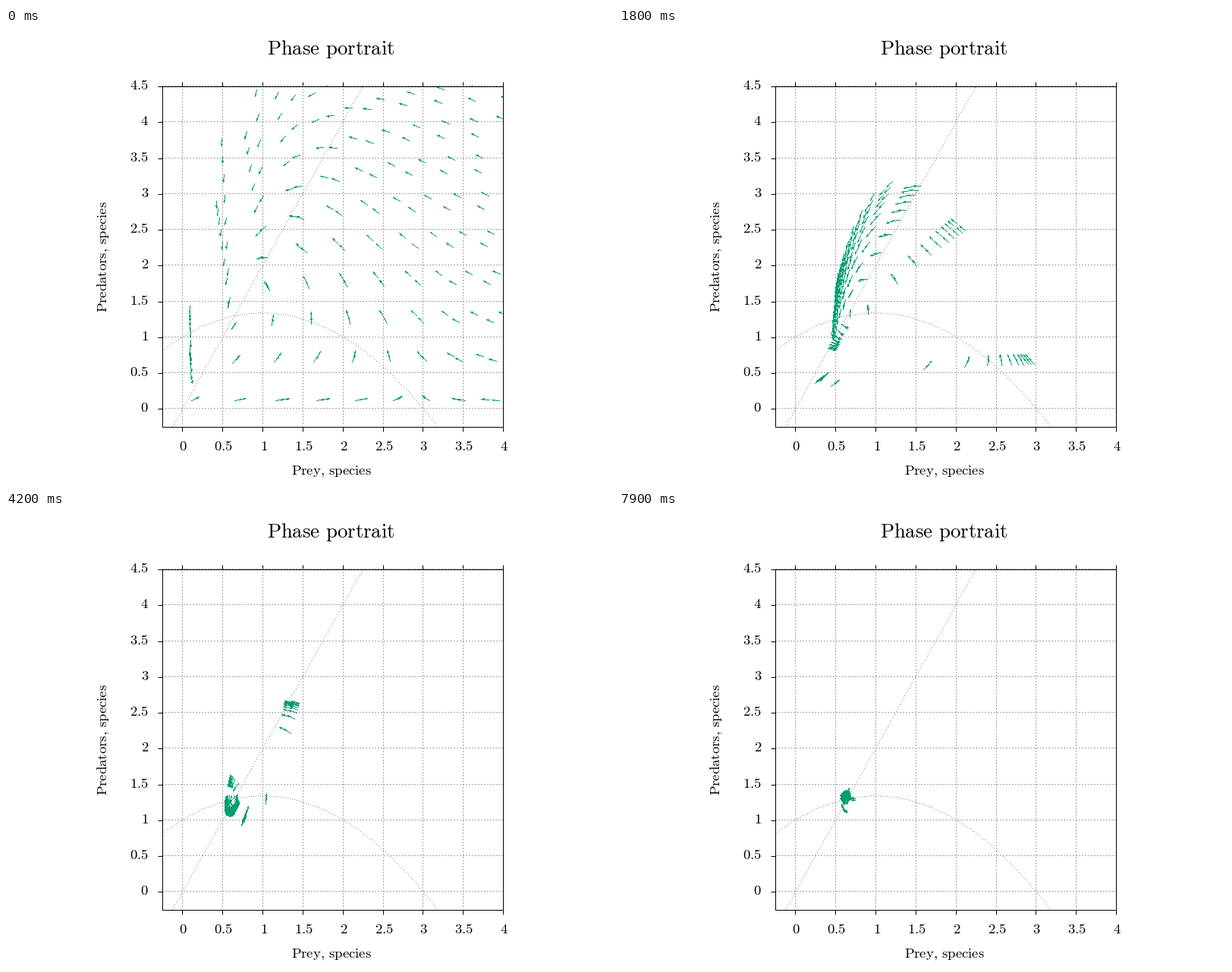
These frames come from a looping animation (800 by 600 pixels, 8000 ms). A matplotlib script:

```python
import numpy as np
import matplotlib.pyplot as plt
from matplotlib.animation import FuncAnimation
from matplotlib.patches import Rectangle

plt.rcParams["mathtext.fontset"] = "cm"

W, H, DPI = 800, 600, 100
PX = 72 / DPI
LEFT, RIGHT, TOP, BOTTOM = 206, 655, 77, 526
XMIN, XMAX, YMIN, YMAX = -0.25, 4.0, -0.25, 4.5
GREEN, GRID, CURVE = "#009e73", "#a0a0a0", "#909090"
FRAMES, INTERVAL = 80, 100
DT, SUBSTEPS = 0.1, 25
ARROW = 0.1                                   # arrow length in plot units
HEAD_SIZE, HEAD_ANGLE = 0.3, np.radians(15)   # head length relative to arrow


def to_px(p):
    x = LEFT + (p[..., 0] - XMIN) / (XMAX - XMIN) * (RIGHT - LEFT)
    y = BOTTOM - (p[..., 1] - YMIN) / (YMAX - YMIN) * (BOTTOM - TOP)
    return np.stack([x, y], axis=-1)


def field(p):
    """Prey grow logistically; predators are limited by twice the prey."""
    x, y = p[..., 0], p[..., 1]
    dx = x * (1 - x / 3) - x * y / (1 + x)
    dy = y * (1 - y / (2 * x))
    return np.stack([dx, dy], axis=-1)


def rk4(p, h):
    k1 = field(p)
    k2 = field(p + h / 2 * k1)
    k3 = field(p + h / 2 * k2)
    k4 = field(p + h * k3)
    return p + h / 6 * (k1 + 2 * k2 + 2 * k3 + k4)


def solve(steps):
    start = 0.1 + 0.5 * np.arange(11)
    p = np.stack(np.meshgrid(start, start), axis=-1).reshape(-1, 2)
    states = [p]
    for _ in range(steps):
        for _ in range(SUBSTEPS):
            p = rk4(p, DT / SUBSTEPS)
        states.append(p)
    return np.array(states)


def raster(a, b):
    """Pixels of the hard-edged lines from a to b, line after line."""
    a, b = np.rint(a), np.rint(b)
    n = np.maximum(np.abs(b - a).max(axis=1), 1)
    k = np.arange(n.max() + 1)
    t = np.minimum(k / n[:, None], 1)[..., None]
    p = np.rint(a[:, None] + t * (b - a)[:, None])
    p = p[k <= n[:, None]]
    inside = ((p >= (LEFT, TOP)) & (p <= (RIGHT, BOTTOM))).all(axis=1)
    return p[inside]


def rotate(v, angle):
    c, s = np.cos(angle), np.sin(angle)
    return v @ np.array([[c, s], [-s, c]])


def arrow_pixels(p):
    v = field(p)
    v = v / np.linalg.norm(v, axis=-1, keepdims=True)
    tail, tip = to_px(p), to_px(p + ARROW * v)
    barb = HEAD_SIZE * (tail - tip)
    ends = [tail, tip + rotate(barb, HEAD_ANGLE), tip + rotate(barb, -HEAD_ANGLE)]
    return np.concatenate([raster(e, tip) for e in ends])


states = solve(FRAMES + 1)

fig = plt.figure(figsize=(W / DPI, H / DPI), dpi=DPI, facecolor="white")
ax = fig.add_axes([0, 0, 1, 1])
ax.set_xlim(0, W)
ax.set_ylim(H, 0)
ax.axis("off")
ax.add_patch(Rectangle((LEFT, TOP), RIGHT - LEFT, BOTTOM - TOP, fill=False,
                       ec="black", lw=PX, zorder=5))


def dots(x, y, color, zorder=2):
    art, = ax.plot(x, y, ",", color=color, zorder=zorder)
    return art


def tick(xs, ys):
    ax.plot(xs, ys, color="black", lw=PX, solid_capstyle="butt")


def text(x, y, s, size=18.67, **kw):
    s = s.replace(", ", r",\,").replace(" ", r"\,\>")
    ax.text(x, y, rf"$\mathrm{{{s}}}$", fontsize=size * PX, va="baseline",
            rotation_mode="anchor", **kw)


def dashed(lo, hi):
    p = np.arange(lo, hi)
    return p[(p - lo) % 4 < 2]


def nullcline(x, y):
    q = to_px(np.stack([x, y], axis=-1))
    p = raster(q[:-1], q[1:])
    p = p[np.r_[True, (np.diff(p, axis=0) != 0).any(axis=1)]]
    dots(*p[::3].T, CURVE)


row, col = dashed(LEFT, RIGHT), dashed(TOP, BOTTOM)
for v in np.arange(0, 4.6, 0.5):
    x, y = np.rint(to_px(np.array([v, v])))
    dots(row, np.full(row.size, y), GRID)
    tick([LEFT - 6, LEFT], [y, y])
    text(188, y + 4, f"{v:g}", ha="right")
    if v <= XMAX:
        dots(np.full(col.size, x), col, GRID)
        tick([x, x], [BOTTOM, BOTTOM + 6])
        tick([x, x], [TOP - 6, TOP])
        text(x + 1.5, 557, f"{v:g}", ha="center")

xs = np.linspace(XMIN, XMAX, 100)
nullcline(xs, 2 * xs)
nullcline(xs, (1 - xs / 3) * (1 + xs))

text(428.5, 35, "Phase portrait", 26.67, ha="center")
text(429, 588, "Prey, species", ha="center")
text(133, 302, "Predators, species", ha="center", rotation=90)

arrows = dots([], [], GREEN, zorder=4)


def update(i):
    # two consecutive instants are shown together
    arrows.set_data(*arrow_pixels(states[i + 1:i + 3].reshape(-1, 2)).T)
    return arrows,


anim = FuncAnimation(fig, update, frames=FRAMES, interval=INTERVAL,
                     repeat=True, repeat_delay=0, blit=False)
plt.show()
```
